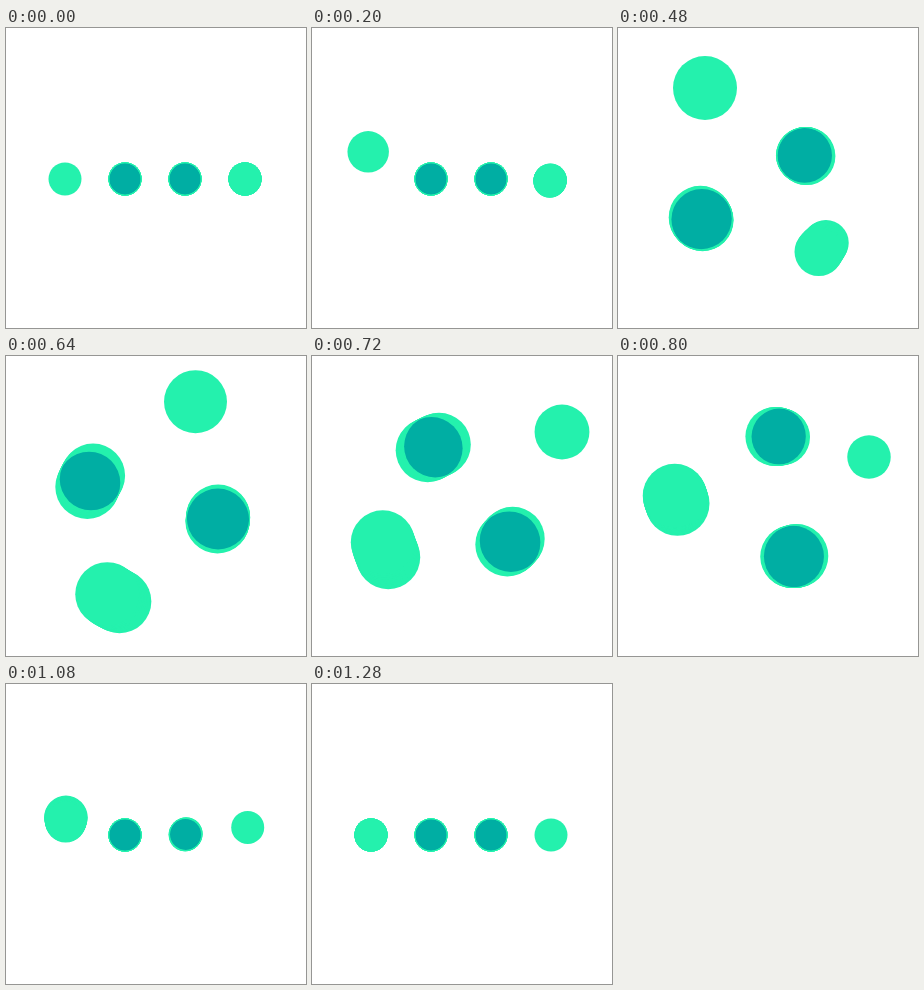
Recreate the animation shown at these times as an HTML page with a canvas. Size 300 px wide and 300 px high, loop 1.32 s.

```html
<!DOCTYPE html>
<html lang="en">
<head>
<meta charset="utf-8">
<title>Four orbiting dots</title>
<style>
  html, body { margin: 0; width: 100%; height: 100%; overflow: hidden; background: #fff; }
  canvas { display: block; width: 300px; height: 300px; }
</style>
</head>
<body>
<canvas id="stage" width="300" height="300"></canvas>
<script>
const ctx = document.getElementById('stage').getContext('2d');
const LOOP = 1320, STEP = 40, SHUTTER = 10;
const LIGHT = '#24f1ad', DARK = '#00aea3';
const REST = 16.5, FULL = 32, SWELL = 320;

// The dots rest in four slots in a row; each trades places with its mirror slot
const slot = i => ({ x: 59 + 60 * i, y: 151 });

// Leaves a slot at `start`, swings through the turns [ms, x, y], lands at `end`
function makeDot(index, { start, end, grow, shrink, turns, blur = true }) {
  const path = [
    { t: start, ...slot(index) },
    ...turns.map(([t, x, y]) => ({ t, x, y })),
    { t: end, ...slot(3 - index) }
  ];
  return { path, grow, shrink, blur, dark: index === 1 || index === 2 };
}

const dots = [
  { start: 60, end: 1180, grow: 90, shrink: 605, blur: false, turns: [
    [320, 60.5, 89.5], [480, 87, 60], [640, 189.5, 45.7],
    [720, 250, 76], [800, 251, 101], [960, 247, 125.5]] },
  { start: 270, end: 1100, grow: 200, shrink: 710, turns: [
    [320, 107.5, 169.5], [480, 83.5, 191], [600, 75, 150],
    [640, 84, 125], [800, 160.5, 80.5], [960, 187, 131]] },
  { start: 240, end: 1040, grow: 260, shrink: 770, turns: [
    [320, 172, 151.5], [480, 187, 127.5], [640, 212, 163],
    [800, 176, 200.5], [960, 136, 173.5]] },
  { start: 140, end: 1180, grow: 330, shrink: 875, turns: [
    [320, 230, 168], [480, 204.5, 219], [560, 167, 258],
    [640, 107, 242], [800, 58, 143.5], [960, 60.5, 117.3]] }
].map((motion, index) => makeDot(index, motion));

function smooth(t, from) {
  const u = Math.min(1, Math.max(0, (t - from) / SWELL));
  return u * u * (3 - 2 * u);
}

const radiusAt = (dot, t) =>
  REST + (FULL - REST) * (smooth(t, dot.grow) - smooth(t, dot.shrink));

// Speed at a key: the neighbouring speeds, the shorter span counting more
function speedAt(path, i, axis) {
  const before = path[i - 1], key = path[i], after = path[i + 1];
  if (!before || !after) return 0;
  const h0 = key.t - before.t, h1 = after.t - key.t;
  const v0 = (key[axis] - before[axis]) / h0, v1 = (after[axis] - key[axis]) / h1;
  return (v0 * h1 + v1 * h0) / (h0 + h1);
}

// Hermite curve through the keys, at rest at both ends
function positionAt(path, t) {
  const next = path.findIndex(key => key.t > t);
  if (next === 0) return path[0];
  if (next < 0) return path[path.length - 1];
  const i = next - 1, a = path[i], b = path[next], span = b.t - a.t;
  const u = (t - a.t) / span, v = 1 - u;
  const along = axis =>
    a[axis] * v * v * (1 + 2 * u) + b[axis] * u * u * (3 - 2 * u) +
    span * u * v * (speedAt(path, i, axis) * v - speedAt(path, next, axis) * u);
  return { x: along('x'), y: along('y') };
}

function trace(dot, t, inset = 0) {
  const { x, y } = positionAt(dot.path, t);
  ctx.beginPath();
  ctx.arc(x, y, radiusAt(dot, t) - inset, 0, Math.PI * 2);
}

function drawDot(dot, t) {
  const reach = dot.blur ? SHUTTER : 0;
  const samples = dot.blur ? 4 : 0;
  ctx.fillStyle = LIGHT;
  for (let k = -samples; k <= samples; k++) {
    trace(dot, t + reach * k / 4);
    ctx.fill();
  }
  if (!dot.dark) return;
  // The dark core shows where the dot stays for most of the exposure
  ctx.save();
  trace(dot, t - reach / 3, 0.8);
  ctx.clip();
  trace(dot, t + reach / 3, 0.8);
  ctx.fillStyle = DARK;
  ctx.fill();
  ctx.restore();
}

function frame() {
  const t = Math.floor(performance.now() % LOOP / STEP) * STEP;
  ctx.fillStyle = '#fff';
  ctx.fillRect(0, 0, 300, 300);
  dots.forEach(dot => drawDot(dot, t));
  requestAnimationFrame(frame);
}
frame();
</script>
</body>
</html>
```
